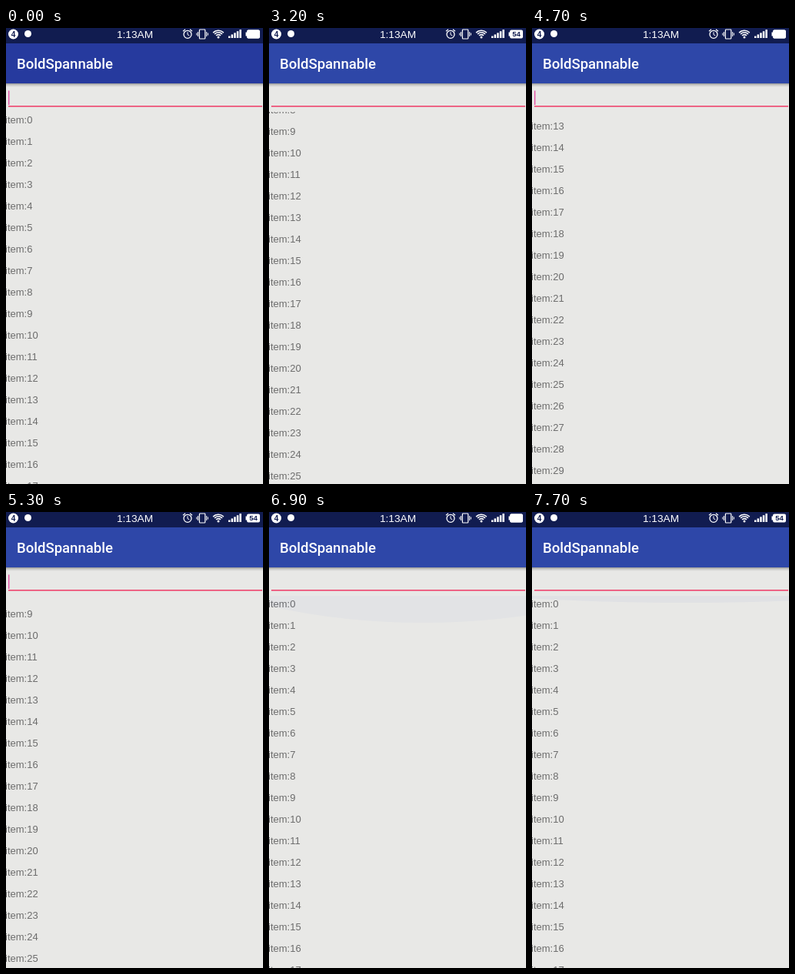
These frames come from a looping animation (334 px wide and 593 px high, 8 s). An HTML page with a canvas:

```html
<!DOCTYPE html>
<html lang="en">
<head>
<meta charset="utf-8">
<title>BoldSpannable</title>
<style>
  html, body { margin: 0; width: 100%; height: 100%; overflow: hidden; background: #e8e8e6; }
  canvas { display: block; width: 334px; height: 593px; }
</style>
</head>
<body>
<canvas id="stage"></canvas>
<script>
const W = 334, H = 593, LOOP = 8000, STEP = 100;
const LIST_TOP = 109, ROW = 28, ITEMS = 30;
const STATUS = '#111c50', PAPER = '#e8e8e6';
const ROBOTO = 'Roboto, sans-serif', PLAIN = '"Liberation Sans", Arial, sans-serif';

const canvas = document.getElementById('stage');
const ctx = canvas.getContext('2d');
const ratio = window.devicePixelRatio || 1;
canvas.width = W * ratio;
canvas.height = H * ratio;
ctx.scale(ratio, ratio);

// [time, value] pairs, linear in between
const SCROLL = [
  [2500, 0], [2600, 14], [2800, 82], [3000, 163], [3200, 237], [3400, 312], [3500, 345], [3600, 356],
  [4700, 356], [4800, 345], [5000, 304], [5300, 239], [5500, 207], [5800, 175], [6200, 158],
  [6400, 158], [6500, 145], [6700, 78], [6800, 32], [6900, 0]
];
const GLOW_BOTTOM = [[3400, 0], [3500, 14], [3600, 27], [3700, 18], [3800, 0]];
const GLOW_TOP = [[6800, 0], [6900, 35], [7000, 35], [7100, 58], [7300, 47], [7500, 26], [7700, 9]];
const TOP_ALPHA = [[6900, 0.03], [7100, 0.08], [7700, 0.045]];

function track(keys, t) {
  if (t <= keys[0][0]) return keys[0][1];
  for (let i = 1; i < keys.length; i++) {
    const [t0, a] = keys[i - 1], [t1, b] = keys[i];
    if (t <= t1) return a + (b - a) * (t - t0) / (t1 - t0);
  }
  return keys[keys.length - 1][1];
}

const mod = (a, n) => ((a % n) + n) % n;

function rect(x, y, w, h, color) {
  ctx.fillStyle = color;
  ctx.fillRect(x, y, w, h);
}

function roundRect(x, y, w, h, r) {
  ctx.beginPath();
  ctx.roundRect(x, y, w, h, r);
}

function disc(x, y, r, color) {
  ctx.beginPath();
  ctx.arc(x, y, r, 0, Math.PI * 2);
  ctx.fillStyle = color;
  ctx.fill();
}

function line(points, width = 1.2) {
  ctx.beginPath();
  points.forEach(([x, y], i) => i ? ctx.lineTo(x, y) : ctx.moveTo(x, y));
  ctx.lineWidth = width;
  ctx.strokeStyle = '#fff';
  ctx.stroke();
}

function text(str, x, y, font, color, align = 'left') {
  ctx.font = font;
  ctx.textAlign = align;
  ctx.fillStyle = color;
  ctx.fillText(str, x, y);
}

// Overscroll: a flattened circle peeking in from a list edge
function glow(edge, dir, height, centerX, alpha) {
  if (height <= 0) return;
  const radius = W * 1.5, squash = height / (radius * (1 - Math.cos(Math.PI / 6)));
  ctx.beginPath();
  ctx.ellipse(centerX, edge + dir * (height - radius * squash), radius, radius * squash, 0, 0, Math.PI * 2);
  ctx.fillStyle = `rgba(48, 72, 180, ${alpha})`;
  ctx.fill();
}

function drawList(t) {
  const scroll = track(SCROLL, t);
  ctx.save();
  ctx.beginPath();
  ctx.rect(0, LIST_TOP, W, H - LIST_TOP);
  ctx.clip();
  for (let i = 0; i < ITEMS; i++) {
    const y = LIST_TOP + 15 + i * ROW - scroll;
    if (y > LIST_TOP - 5 && y < H + 15) text('item:' + i, -1, y, `13px ${PLAIN}`, '#6c6c6c');
  }
  glow(H, -1, track(GLOW_BOTTOM, t), 192, 0.14);
  glow(LIST_TOP, 1, track(GLOW_TOP, t), 200, track(TOP_ALPHA, t));
  ctx.restore();
}

function drawField(t) {
  rect(3, 101, 330, 1.6, '#ee446e');
  const cursorOn = t < 600 || mod(t - 911, 871) < 477;
  if (cursorOn) rect(3, 81.5, 1.4, 18.5, '#e252a4');
}

function drawBattery(t) {
  const phase = mod(t - 200, 2300);
  const charging = phase >= 1700;
  rect(311.5, 5.5, 2, 5, '#fff');
  roundRect(313, 2.5, 17, 11, 2);
  if (!charging) {
    ctx.fillStyle = '#fff';
    ctx.fill();
    text('54', 321.5, 11.4, `bold 9.5px ${PLAIN}`, STATUS, 'center');
    return;
  }
  const level = Math.min(1, 0.55 + (phase - 1700) / 300 * 0.45);
  ctx.fillStyle = level < 1 ? STATUS : '#fff';
  ctx.fill();
  roundRect(313.5, 3, 16, 10, 1.5);
  ctx.strokeStyle = '#fff';
  ctx.lineWidth = 1;
  ctx.stroke();
  rect(328 - 13 * level, 4.5, 13 * level, 7, '#fff');
}

function drawStatus(t) {
  rect(0, 0, W, 20, STATUS);
  disc(9.5, 8, 6.5, '#fff');
  text('4', 9.5, 11.7, `bold 10px ${PLAIN}`, STATUS, 'center');
  disc(28.5, 7.5, 4.5, '#fff');
  text('1:13AM', 167.5, 13, `13.7px ${PLAIN}`, '#fff', 'center');

  // alarm
  ctx.lineWidth = 1.3;
  ctx.strokeStyle = '#fff';
  ctx.beginPath();
  ctx.arc(236, 8.3, 5, 0, Math.PI * 2);
  ctx.stroke();
  line([[236, 5.3], [236, 8.6], [238.3, 9.8]], 1);
  line([[230, 4.2], [233, 1.8]]);
  line([[242, 4.2], [239, 1.8]]);

  // vibrate
  roundRect(251.4, 2, 7.4, 12, 0.8);
  ctx.stroke();
  for (const side of [-1, 1]) {
    line([[255.1 + side * 5.6, 5], [255.1 + side * 5.6, 11]], 1);
    line([[255.1 + side * 7.3, 6.5], [255.1 + side * 7.3, 9.5]], 1);
  }

  // wifi
  disc(276, 12, 1.5, '#fff');
  ctx.lineWidth = 1.6;
  for (const r of [4, 6.8, 9.4]) {
    ctx.beginPath();
    ctx.arc(276, 12.6, r, -Math.PI * 0.76, -Math.PI * 0.24);
    ctx.stroke();
  }

  // signal
  for (let i = 0; i < 5; i++) {
    const h = 2.5 + i * 2.1;
    rect(289 + i * 3.6, 13 - h, 2.5, h, '#fff');
  }
  drawBattery(t);
}

function drawAppBar(t) {
  const shade = ctx.createLinearGradient(0, 72, 0, 77);
  shade.addColorStop(0, 'rgba(0, 0, 0, 0.36)');
  shade.addColorStop(0.4, 'rgba(0, 0, 0, 0.14)');
  shade.addColorStop(1, 'rgba(0, 0, 0, 0)');
  rect(0, 72, W, 5, shade);
  rect(0, 20, W, 52, t < 100 ? '#263a9e' : '#2e47a8');
  text('BoldSpannable', 14, 53, `500 18.55px ${ROBOTO}`, '#fff');
}

function draw(t) {
  rect(0, 0, W, H, PAPER);
  drawList(t);
  drawField(t);
  drawAppBar(t);
  drawStatus(t);
}

const start = performance.now();
function tick() {
  const t = (performance.now() - start) % LOOP;
  draw(Math.floor(t / STEP) * STEP);
  requestAnimationFrame(tick);
}
tick();
</script>
</body>
</html>
```
